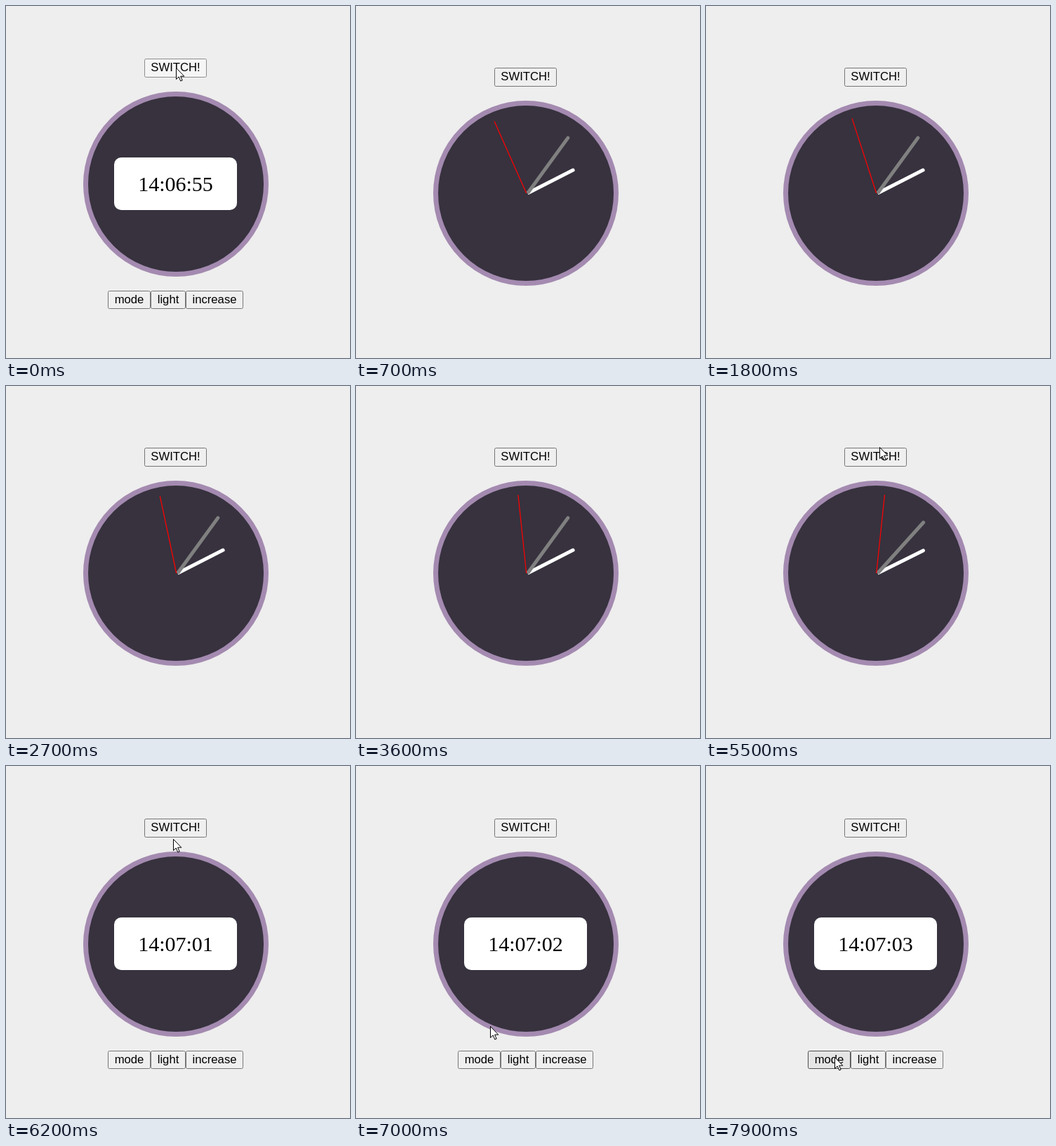
An HTML page for the animation above (8000 ms loop, 490x502 px).

```html
<!DOCTYPE html>
<html lang="en">
<head>
<meta charset="utf-8">
<title>Clock switch</title>
<style>
  html, body { margin: 0; width: 100%; height: 100%; overflow: hidden; background: #eee; }
  svg { display: block; }
  text { text-anchor: middle; }
  .button text { font: 16.667px Arial, "Liberation Sans", sans-serif; }
  .button rect { fill: #efefef; stroke: #767676; }
  .button.hover rect { fill: #e5e5e5; stroke: #4f4f4f; }
  .button.press rect { fill: #f5f5f5; stroke: #8d8d8d; }
  #time { font: 30px "Times New Roman", "Liberation Serif", serif; }
</style>
</head>
<body>
<svg width="490" height="502" viewBox="0 0 490 502">
  <g id="clock">
    <circle cx="242" cy="254" r="128.5" fill="#37323e" stroke="#a48ab0" stroke-width="7"/>
    <g id="digital">
      <rect x="154" y="216" width="175" height="75" rx="10" fill="#fff"/>
      <text id="time" x="241.5" y="264"></text>
    </g>
    <g id="analog">
      <path id="hour" fill="#fff"/>
      <path id="minute" fill="#808080"/>
      <path id="second" fill="#f00"/>
    </g>
  </g>
  <path id="cursor" d="M.5 .5V16.5L4.2 13L6.8 19L9.2 18L6.6 12.2H11.8Z" fill="#fff" stroke="#000"/>
</svg>
<script>
const $ = id => document.getElementById(id);
const LOOP = 8000, FRAME = 100;
const TO_ANALOG = 100, TO_DIGITAL = 6000, PRESS = 5900;
const START = 14 * 3600 + 6 * 60 + 55, FIRST_TICK = 400;

// time, x, y of the pointer tip
const path = [
  [0, 242, 88], [200, 242, 88], [400, 400, 130], [500, 500, 150],
  [4700, 500, 110], [4800, 446, 105], [5100, 300, 72], [5400, 250, 75],
  [5500, 247, 87], [5700, 238, 104], [6400, 238, 104], [7100, 183, 415], [LOOP, 183, 415]
];

function makeButton(parent, label, x, y, w, h, baseline) {
  const g = document.createElementNS("http://www.w3.org/2000/svg", "g");
  g.innerHTML = `<rect x="${x + .5}" y="${y + .5}" width="${w - 1}" height="${h - 1}" rx="2"/>
    <text x="${x + w / 2}" y="${baseline}">${label}</text>`;
  parent.append(g);
  return { g, x, y, w, h };
}

const toggle = makeButton($("clock"), "SWITCH!", 197, 75, 89, 27, 93);
const controls = [["mode", 145, 61], ["light", 206, 50], ["increase", 256, 82]]
  .map(([label, x, w]) => makeButton($("digital"), label, x, 406, w, 26, 424));

function shapeHand(id, width, length, x) {
  const r = width / 2;
  $(id).setAttribute("d", `M${x - r} 254v${r - length}a${r} ${r} 0 0 1 ${width} 0v${length - r}z`);
  return angle => $(id).setAttribute("transform", `rotate(${angle} ${x} 254)`);
}
const turnHour = shapeHand("hour", 5, 75, 244.5);
const turnMinute = shapeHand("minute", 5, 100, 244.5);
const turnSecond = shapeHand("second", 1.25, 112.5, 242.7);

function pointerAt(t) {
  const i = path.findIndex(p => p[0] > t);
  const [t0, x0, y0] = path[i - 1], [t1, x1, y1] = path[i];
  const k = (t - t0) / (t1 - t0);
  return [x0 + (x1 - x0) * k, y0 + (y1 - y0) * k];
}

function draw(now) {
  const t = Math.floor(now % LOOP / FRAME) * FRAME;
  const analog = t >= TO_ANALOG && t < TO_DIGITAL;
  const shift = analog ? 13 : 0;
  $("clock").setAttribute("transform", `translate(0 ${shift})`);
  $("analog").style.display = analog ? "" : "none";
  $("digital").style.display = analog ? "none" : "";

  const total = START + Math.floor((t - FIRST_TICK) / 1000) + 1;
  const h = Math.floor(total / 3600), m = Math.floor(total / 60) % 60, s = total % 60;
  $("time").textContent = [h, m, s].map(n => String(n).padStart(2, "0")).join(":");
  turnHour(h % 12 * 30 + m / 2);
  turnMinute(m * 6);
  turnSecond(s * 6);

  const [x, y] = pointerAt(t);
  $("cursor").setAttribute("transform", `translate(${Math.round(x)} ${Math.round(y)})`);
  const pressed = t < TO_ANALOG || (t >= PRESS && t < TO_DIGITAL);
  for (const b of [toggle, ...controls]) {
    const top = b.y + shift;
    const over = x >= b.x && x < b.x + b.w && y >= top && y < top + b.h;
    b.g.setAttribute("class", "button" + (over ? pressed ? " press" : " hover" : ""));
  }
  requestAnimationFrame(() => draw(performance.now() - begin));
}
const begin = performance.now();
draw(0);
</script>
</body>
</html>
```
